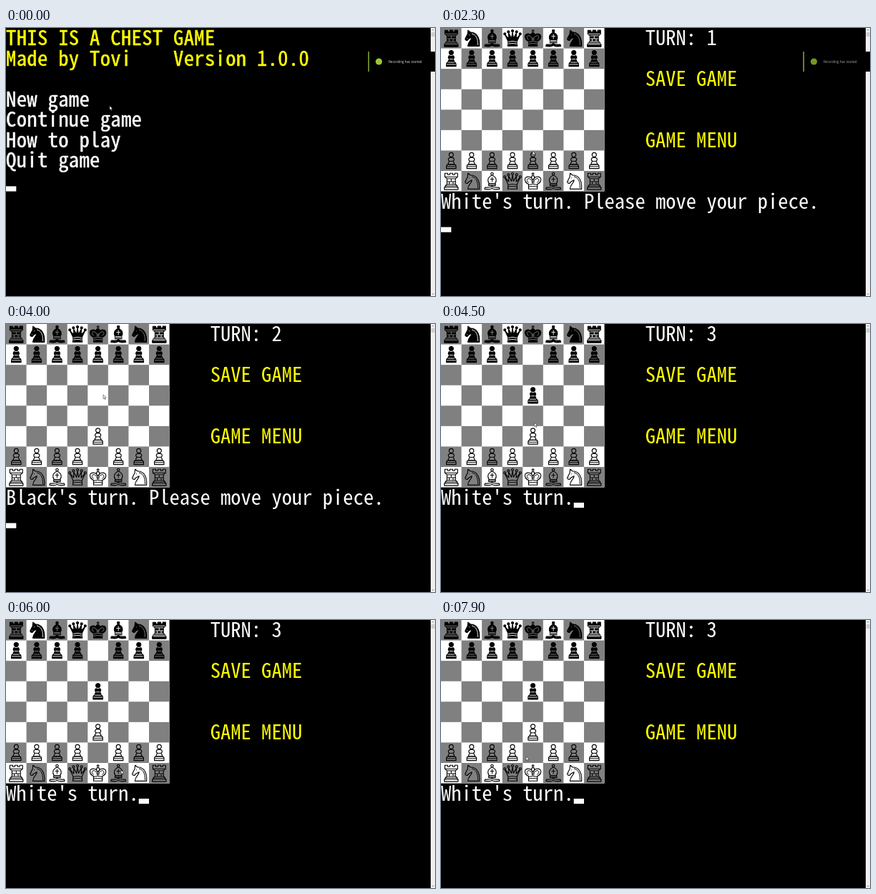
Animation, 600 px wide and 375 px high, one loop 8000 ms. Source, as an HTML page:

```html
<!DOCTYPE html>
<html lang="en">
<head>
<meta charset="utf-8">
<title>Console chess</title>
<style>
  html, body { margin: 0; width: 100%; height: 100%; overflow: hidden; background: #000; }
  svg { display: block; width: 600px; height: 375px; }
  text { white-space: pre; }
  .con { font: 28.6px "Noto Sans Mono CJK JP", "Noto Sans Mono CJK SC", "Noto Sans Mono", monospace; }
  .bold { stroke-width: .5px; }
  .note { font: 4.6px "Open Sans", "Noto Sans", sans-serif; }
</style>
</head>
<body>
<script>
const LOOP = 8000, SQ = 600 / 21, CELL = SQ / 2, BOLD_CELL = 14.63;
const WHITE = '#fff', YELLOW = '#ff0', GREY = '#808080', LIME = '#9bc832';

function add(parent, tag, attrs = {}, content = '') {
  const el = document.createElementNS('http://www.w3.org/2000/svg', tag);
  for (const key in attrs) el.setAttribute(key, attrs[key]);
  el.textContent = content;
  parent.append(el);
  return el;
}

const svg = add(document.body, 'svg', { viewBox: '0 0 600 375' });
const group = (parent = svg) => add(parent, 'g');
const rect = (parent, x, y, width, height, fill) => add(parent, 'rect', { x, y, width, height, fill });
const show = (el, on) => el.setAttribute('visibility', on ? 'visible' : 'hidden');

// Console text: keep the font's own glyphs on a fixed cell grid
const probe = add(svg, 'text', { class: 'con', visibility: 'hidden' }, 'MMMMMMMMMM');
const advance = probe.getComputedTextLength() / 10;
probe.remove();

function line(parent, col, row, str, fill, bold = false) {
  const cell = bold ? BOLD_CELL : CELL;
  const el = add(parent, 'text', {
    x: col * cell, y: row * SQ + 24, fill, class: bold ? 'con bold' : 'con',
    style: `letter-spacing:${(cell - advance).toFixed(3)}px`
  }, str);
  if (bold) el.setAttribute('stroke', fill);
  return el;
}

// Menu screen
const menu = group();
line(menu, 0, 0, 'THIS IS A CHEST GAME', YELLOW, true);
line(menu, 0, 1, 'Made by Tovi    Version 1.0.0', YELLOW, true);
['New game', 'Continue game', 'How to play', 'Quit game']
  .forEach((item, i) => line(menu, 0, i + 3, item, WHITE, true));

// Chess pieces: body outline, then inner detail lines, in one board square
const dot = (x, y, r) => `M${x - r} ${y}a${r} ${r} 0 1 0 ${2 * r} 0a${r} ${r} 0 1 0 ${-2 * r} 0z`;
const bands = 'M8.3 19.4q6-2 12 0M7.9 22.2q6.4-1.6 12.8 0';
const PIECES = {
  p: [dot(14.3, 6, 3) + 'M12.3 9.8C9.6 11.2 9.6 13.6 11.8 15C10.6 16.4 10 17.6 9.8 19.5H18.8' +
      'C18.6 17.6 18 16.4 16.8 15C19 13.6 19 11.2 16.3 9.8zM7.6 25.2v-2.8q0-2.9 3-2.9h7.4q3 0 3 2.9v2.8z',
      'M11.8 15h5M12.3 9.8h4M10 19.5h8.6M8 22.4h12.6'],
  r: ['M5.4 3.2h4v2h2.9v-2h4v2h2.9v-2h4v5.2l-3 2.5v7.8l2.4 2v2.2h1.3v3.2H4.7v-3.2H6v-2.2l2.4-2v-7.8l-3-2.5z',
      'M6 8.3h16.6M8.5 10.9h11.6M8.5 18.8h11.6M6.2 21H22.4M5.8 22.9h17M14.3 11v4M11.5 15v4M17 15v4M8.5 15h11.6'],
  n: ['M9 25.3C9 18.5 15 17 14.6 12.7C12 14.8 10.5 14 9 16.6C8 18.4 5 17.2 5.3 15L8.6 8.5L9.2 3.2L12.6 6' +
      'C21.5 5.6 26 14 25.2 25.3z', 'M10.6 9.6l1 .5M7.2 15l.7-.5M14.5 8C20.5 9 23.2 15 23 24'],
  b: [dot(14.3, 4, 1.7) + 'M14.3 5.8C7.6 9.4 7.4 14 10.2 17.5H18.4C21.2 14 21 9.4 14.3 5.8zM9.6 17.5h9.4v3.2H9.6z' +
      'M14.3 20.7C14 23.4 10 23.4 4.6 23L3.8 25.4C10 26.4 13 26 14.3 24C15.6 26 18.6 26.4 24.8 25.4' +
      'L24 23C18.6 23.4 14.6 23.4 14.3 20.7z', 'M14.3 8.4v7M11.5 11.6h5.6M10.2 17.5h8.2M9.6 19.2h9.4'],
  q: ['M7.8 18L3.8 9.5L9.2 15L8.8 6.8L12.9 14.5L14.3 5.5L15.7 14.5L19.8 6.8L19.4 15L24.8 9.5L20.8 18' +
      'C19.8 20 20.3 21.5 21 25.2H7.6C8.3 21.5 8.8 20 7.8 18z' +
      [[3.5, 8.3], [8.6, 5.4], [14.3, 4], [20, 5.4], [25.1, 8.3]].map(([x, y]) => dot(x, y, 1.5)).join(''), bands],
  k: ['M8.2 25.2V18.8C.2 14 2.6 7 9 8.2C12 8.8 13.5 11 14.3 13C15.1 11 16.6 8.8 19.6 8.2C26 7 28.4 14 20.4 18.8V25.2z' +
      'M14.3 13C10.8 9 12 6.6 14.3 6.6C16.6 6.6 17.8 9 14.3 13zM14.3 6.6V2M12 4h4.6',
      bands + 'M14.3 13v4.8M8.5 16.6C4 13 6.4 9.7 9.8 11C12 12 13 14 13 16.8M20.1 16.6C24.6 13 22.2 9.7 18.8 11C16.6 12 15.6 14 15.6 16.8']
};
const squareColor = (c, r) => (c + r) % 2 ? WHITE : GREY;

function piece(parent, kind, c, r, black) {
  const g = add(parent, 'g', { transform: `translate(${c * SQ} ${r * SQ})`, 'stroke-linejoin': 'round' });
  const back = squareColor(c, r), [body, detail] = PIECES[kind];
  add(g, 'path', { d: body, fill: black ? '#000' : back, stroke: '#000', 'stroke-width': 1.15 });
  add(g, 'path', { d: detail, fill: 'none', stroke: black ? back : '#000', 'stroke-width': black ? .9 : 1 });
  return g;
}

// Game screen
const game = group();
rect(game, 0, 0, 8 * SQ, 8 * SQ, WHITE);
for (let r = 0; r < 8; r++)
  for (let c = r % 2; c < 8; c += 2) rect(game, c * SQ, r * SQ, SQ, SQ, GREY);
const moved = {};
[...'rnbqkbnr'].forEach((kind, c) => {
  piece(game, kind, c, 0, true);
  piece(game, kind, c, 7, false);
  const black = piece(game, 'p', c, 1, true), white = piece(game, 'p', c, 6, false);
  if (c === 4) Object.assign(moved, { black, white });
});
const landed = { black: piece(game, 'p', 4, 3, true), white: piece(game, 'p', 4, 5, false) };
const turnText = line(game, 20, 0, '', WHITE);
line(game, 20, 2, 'SAVE GAME', YELLOW);
line(game, 20, 5, 'GAME MENU', YELLOW);
const status = line(game, 0, 8, '', WHITE);

const caret = rect(svg, 0, 0, CELL, SQ / 4, WHITE);

// Window scrollbar
rect(svg, 594, 0, 6, 375, '#f0f0f0');
rect(svg, 594.4, 6, 5.2, 6, '#cdcdcd');
add(svg, 'path', { d: 'M595.6 3.6l1.4-1.5 1.4 1.5M595.6 371.4l1.4 1.5 1.4-1.5', fill: 'none', stroke: '#606060', 'stroke-width': .7 });

// Recording notice
const notice = group();
rect(notice, 507, 33, 93, 28, '#000');
rect(notice, 506.5, 33, 1.3, 28, LIME);
const noticeBody = group(notice);
add(noticeBody, 'circle', { cx: 521.5, cy: 47, r: 4.6, fill: LIME });
add(noticeBody, 'text', { x: 535, y: 48.8, class: 'note', fill: '#ddd' }, 'Recording has started');

const mouse = add(svg, 'path', {
  d: 'M0 0V5.6L1.4 4.4L2.4 6.6L3.3 6.2L2.4 4.1H4.1z', fill: WHITE, stroke: '#222', 'stroke-width': .55
});

// Pointer path: time, x, y
const PATH = [
  [0, 145, 109], [400, 96, 109], [500, 96, 109], [600, 96.5, 107], [900, 96.5, 107],
  [1000, 220, 85], [1100, 399, 60], [1200, 290, 130], [1300, 148, 181], [1400, 148, 181],
  [1800, 129, 185], [2100, 129, 185], [2600, 127, 153], [2800, 127, 153],
  [3400, 129, 42], [3700, 129, 42], [4000, 136, 99], [4300, 132, 98],
  [4700, 129, 178], [5200, 129, 212], [5400, 129, 212], [5600, 131, 144],
  [5800, 161, 210], [6100, 161, 210], [6600, 130.5, 210], [6900, 130.5, 210],
  [7400, 97, 186], [7600, 97, 186], [7900, 119, 191], [8000, 119, 191]
];
// Board state: start, turn, waiting for a move
const STATES = [[800, 1, false], [2100, 1, true], [2700, 2, false], [3500, 2, true],
  [4300, 3, false], [5400, 3, true], [6000, 3, false], [6800, 3, true], [7700, 3, false]];

function at(t) {
  const i = Math.max(1, PATH.findIndex(k => k[0] >= t));
  const [t0, x0, y0] = PATH[i - 1], [t1, x1, y1] = PATH[i];
  const p = (t - t0) / (t1 - t0);
  return [x0 + (x1 - x0) * p, y0 + (y1 - y0) * p];
}
const ramp = (t, from, to) => Math.min(1, Math.max(0, (t - from) / (to - from)));

function draw(time) {
  const t = Math.floor(time % LOOP / 100) * 100;
  const state = STATES.filter(s => s[0] <= t).pop();
  menu.style.display = state ? 'none' : '';
  game.style.display = state ? '' : 'none';
  let col = 0, row = 7;
  if (state) {
    const [, turn, asking] = state;
    const who = (turn % 2 ? 'White' : 'Black') + "'s turn.";
    turnText.textContent = 'TURN: ' + turn;
    status.textContent = asking ? who + ' Please move your piece.' : who;
    [col, row] = asking ? [0, 9] : [who.length, 8];
    show(moved.white, turn < 2);
    show(landed.white, turn > 1);
    show(moved.black, turn < 3);
    show(landed.black, turn > 2);
  }
  caret.setAttribute('x', col * CELL);
  caret.setAttribute('y', (row + .75) * SQ);
  noticeBody.setAttribute('opacity', 1 - ramp(t, 2200, 2600));
  notice.setAttribute('transform', `translate(${95 * ramp(t, 2900, 3300) ** 2} 0)`);
  mouse.setAttribute('transform', `translate(${at(t).join(' ')})`);
}

const start = performance.now();
function tick() {
  draw(performance.now() - start);
  requestAnimationFrame(tick);
}
tick();
</script>
</body>
</html>
```
